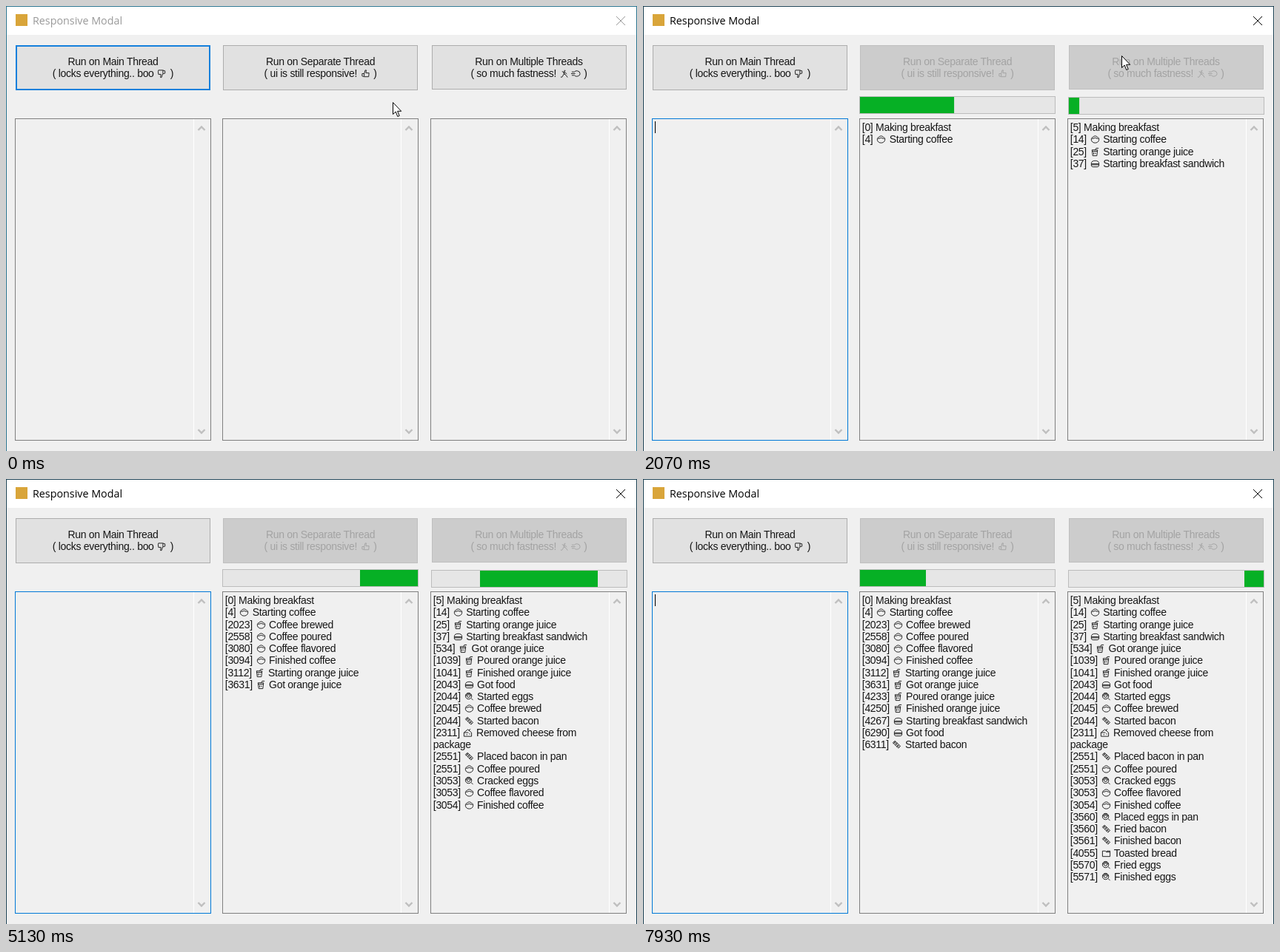
An HTML page for the animation above (8 s loop, 852 by 602 pixels).

```html
<!DOCTYPE html>
<html lang="en">
<head>
<meta charset="utf-8">
<title>Responsive Modal</title>
<style>
  html, body { margin: 0; width: 100%; height: 100%; overflow: hidden; }
  #stage {
    position: relative; width: 852px; height: 602px; overflow: hidden; background: #f0f0f0;
    font: 14px/16.27px "Liberation Sans", sans-serif; letter-spacing: -.3px; color: #161616;
  }
  #stage * { box-sizing: border-box; }
  #stage > * { position: absolute; }
  [hidden] { display: none !important; }
  .titlebar { left: 0; top: 0; width: 852px; height: 39px; background: #fff; color: #000; }
  .titlebar * { position: absolute; }
  .titlebar i { left: 13px; top: 11px; width: 16px; height: 16px; background: #d9a53a; }
  .titlebar b { left: 36px; top: 9px; font: 14.3px/21px "Open Sans", sans-serif; letter-spacing: 0; white-space: nowrap; }
  .titlebar svg { left: 823px; top: 13px; }
  .frame { inset: 0; border: solid #1d4254; border-width: 1px 1px 0; }
  .inactive .titlebar { color: #999; }
  .inactive .frame { border-color: #2b7590; }

  .button {
    top: 53px; width: 263px; height: 61px; padding-top: 13px; text-align: center; white-space: nowrap;
    background: #e1e1e1; border: 1.4px solid #adadad; line-height: 16.3px;
  }
  .button.default { border: 2.4px solid #1580dc; padding-top: 12px; }
  .button.hover { background: #e5f1fb; border-color: #0078d7; }
  .button.pressed { background: #cce4f7; border-color: #005499; }
  .button.disabled { background: #ccc; border-color: #bfbfbf; color: #a3a3a3; }

  .bar { width: 265px; height: 24px; background: #e6e6e6; border: 1px solid #bcbcbc; overflow: hidden; }
  .bar div { position: absolute; left: -1px; top: 0; width: 159px; height: 22px; background: #06b025; }

  .box { top: 152px; width: 265px; height: 436px; border: 1px solid #7f7f7f; }
  .box.focus { border-color: #0078d7; }
  .box.hover { border-color: #171717; }
  .box .rail { position: absolute; left: 240px; top: 0; width: 1px; height: 434px; background: #fff; }
  .box .chevrons { position: absolute; left: 245px; top: 7px; }
  .log { position: absolute; left: 2.8px; top: 3px; width: 237px; }
  .icon { width: 15px; height: 13px; vertical-align: -2px; }
  .icon, .chevrons, .titlebar svg { fill: none; stroke: currentColor; }
  #caret { left: 15.5px; top: 156px; width: 1.5px; height: 16px; background: #000; }
  #cursor { left: 0; top: 0; overflow: visible; }
</style>
</head>
<body>
<div id="stage">
  <div class="titlebar"><i></i><b>Responsive Modal</b>
    <svg width="14" height="14"><path d="M1 1L13 13M13 1L1 13"/></svg></div>
  <div class="frame"></div>
</div>
<script>
const LOOP = 8000, STEP = 800 / 12, FIRST = 730;
const PRESS2 = 1300, START2 = 1440, PRESS3 = 1920, START3 = 2026;
const BAR_SPAN = 424, BAR_LENGTH = 159;

const ICONS = {
  coffee: 'M1.5 8C1 4.500 3 4 4 3.500C5 1.500 9 1.500 10 3.500C12 4 13 5.500 12.500 8C12 11 9 12 7 12S2 11 1.500 8ZM2.500 6Q7 3.500 11.500 6',
  juice: 'M2.500 4H10.500L9.500 12.500H3.500ZM2.500 6H10.500M7 4L8.500 1.500H12M5 7.500V10.500M7.500 8V10',
  sandwich: 'M1.500 6Q2 2.500 7 2.500T12.500 6V9.500Q12 11.500 10 11.500H4Q2 11.500 1.500 9.500ZM1.500 7H12.500M1.500 8.500H12.500',
  egg: 'M1.500 6A4.500 4.500 0 1 1 10.500 6A4.500 4.500 0 1 1 1.500 6ZM4 6A2 2 0 1 1 8 6A2 2 0 1 1 4 6ZM2.500 6A3.500 3.500 0 1 1 9.500 6M9.500 9L12.500 12',
  bacon: 'M1.500 4L4.500 1.500L12.500 9L9.500 12ZM3 2.500L11 10.500M2 5.500L5.500 2.500M4.500 7.500L8 4.500M7 10L10.500 7',
  cheese: 'M1.500 6.500L7 2L12.500 6.500V12H1.500ZM1.500 6.500H8M5 9.500H6.500M9 8.500H10.500M8.500 3L11 1.500',
  bread: 'M1.500 3.500H6L7 5L8 3.500H12.500V11.500H1.500ZM7 5H12',
  down: 'M2 2H8L11.500 3V6.500L8 7.500L6.500 12.500H5L5.500 8H2L1.500 4ZM8.500 2V7',
  up: 'M2 7H5L6.500 2H8L7.500 6H12L11.500 11.500H5L2 10.500ZM5 7V11',
  run: 'M6 2.500H8M7 3L5.500 7L9 9.500L11 12.500M6 7L3 12H1M3 4L7 5L10 7.500M5 5L7.500 8.500',
  dash: 'M1 4.500H5M0 7H6M1 9.500H5M5 4.500Q6 2.500 9 3Q13 3.500 13 7T8 11Q6 11 5 9.500'
};
const icon = name => `<svg class="icon" viewBox="0 0 14 14"><path d="${ICONS[name]}"/></svg>`;

const LOG2 = `0||Making breakfast
4|coffee|Starting coffee
2023|coffee|Coffee brewed
2558|coffee|Coffee poured
3080|coffee|Coffee flavored
3094|coffee|Finished coffee
3112|juice|Starting orange juice
3631|juice|Got orange juice
4233|juice|Poured orange juice
4250|juice|Finished orange juice
4267|sandwich|Starting breakfast sandwich
6290|sandwich|Got food
6311|bacon|Started bacon`;

const LOG3 = `5||Making breakfast
14|coffee|Starting coffee
25|juice|Starting orange juice
37|sandwich|Starting breakfast sandwich
534|juice|Got orange juice
1039|juice|Poured orange juice
1041|juice|Finished orange juice
2043|sandwich|Got food
2044|egg|Started eggs
2045|coffee|Coffee brewed
2044|bacon|Started bacon
2311|cheese|Removed cheese from package
2551|bacon|Placed bacon in pan
2551|coffee|Coffee poured
3053|egg|Cracked eggs
3053|coffee|Coffee flavored
3054|coffee|Finished coffee
3560|egg|Placed eggs in pan
3560|bacon|Fried bacon
3561|bacon|Finished bacon
4055|bread|Toasted bread
5570|egg|Fried eggs
5571|egg|Finished eggs`;

const stage = document.getElementById('stage');
function add(className, left, html = '', parent = stage) {
  const el = document.createElement('div');
  el.className = className;
  if (left !== null) el.style.left = left + 'px';
  el.innerHTML = html;
  return parent.appendChild(el);
}

const buttons = [
  add('button', 13, `Run on Main Thread<br>( locks everything.. boo ${icon('down')} )`),
  add('button', 293, `Run on Separate Thread<br>( ui is still responsive! ${icon('up')} )`),
  add('button', 574.5, `Run on Multiple Threads<br>( so much fastness! ${icon('run')}${icon('dash')} )`)
];
buttons[2].style.height = '60px';

const boxes = [12, 292, 573].map(x => add('box', x, `<div class="rail"></div>
  <svg class="chevrons" width="12" height="422" stroke-width="2.4" color="#bfbfbf">
  <path d="M1.500 8L6 3.500L10.500 8M1.500 413L6 417.500L10.500 413"/></svg><div class="log"></div>`));

// Marquee travel is uneven: [time, distance of the leading edge].
const jobs = [
  { start: START2, box: boxes[1], log: LOG2, bar: add('bar', 292, '<div></div>'), top: 122,
    travel: [[1463, 15], [2063, 128], [3330, 405], [5130, 769], [6930, 1156], [7930, 1362]] },
  { start: START3, box: boxes[2], log: LOG3, bar: add('bar', 573.5, '<div></div>'), top: 123,
    travel: [[2063, 15], [3330, 285], [5130, 649], [6930, 1028], [7930, 1245]] }
];
for (const job of jobs) {
  job.bar.style.top = job.top + 'px';
  const log = job.box.querySelector('.log');
  job.lines = job.log.split('\n').map(line => {
    const [ms, name, text] = line.split('|');
    const el = add('', null, `[${ms}] ${name ? icon(name) + ' ' : ''}${text}`, log);
    return { el, at: job.start + Number(ms) };
  });
}

const caret = add('', null);
caret.id = 'caret';
stage.insertAdjacentHTML('beforeend', `<svg id="cursor" width="14" height="22">
  <path id="arrow" d="M.5.5V16.500L4.200 13L6.800 19.500L9.200 18.500L6.600 12.300H11.700Z" fill="#fff" stroke="#000"/>
  <path id="beam" d="M-2.500-7.500H-.5L.5-6.500L1.500-7.500H3.500M.5-6.500V6.500M-2.500 7.500H-.5L.5 6.500L1.500 7.500H3.500" fill="none" stroke="#222"/></svg>`);
const [cursor, arrow, beam] = ['cursor', 'arrow', 'beam'].map(id => document.getElementById(id));

const POINTER = [
  [730, 522, 130], [1060, 522, 83], [1540, 522, 83], [1860, 646, 67],
  [2430, 646, 67], [3000, 594, 224], [4400, 594, 224], [4680, 600, 602]
];
const smooth = p => p * p * (3 - 2 * p);

function track(points, t, ease = p => p) {
  const next = points.findIndex(p => p[0] > t);
  if (next === 0) return points[0].slice(1);
  if (next < 0) return points.at(-1).slice(1);
  const a = points[next - 1], b = points[next];
  const p = ease((t - a[0]) / (b[0] - a[0]));
  return a.slice(1).map((v, i) => v + (b[i + 1] - v) * p);
}

const within = (x, y, left, top, width, height) =>
  x >= left && x < left + width && y >= top && y < top + height;
const toggle = (el, states) => {
  for (const name in states) el.classList.toggle(name, states[name]);
};

function render(time) {
  const t = time < FIRST ? 0 : FIRST + Math.floor((time - FIRST) / STEP + .001) * STEP;
  const [x, y] = track(POINTER, t, smooth);
  const overText = within(x, y, 573, 152, 265, 436);

  stage.classList.toggle('inactive', t < PRESS2);
  toggle(buttons[0], { default: t < PRESS2 });
  toggle(buttons[1], {
    default: t >= PRESS2 && t < START2,
    hover: t < START2 && within(x, y, 293, 53, 263, 61),
    pressed: t >= PRESS2 && t < START2,
    disabled: t >= START2
  });
  toggle(buttons[2], {
    default: t >= START2 && t < START3,
    hover: t < START3 && within(x, y, 574, 53, 263, 60),
    pressed: t >= PRESS3 && t < START3,
    disabled: t >= START3
  });
  toggle(boxes[0], { focus: t >= START3 });
  toggle(boxes[2], { hover: overText });
  caret.hidden = t < START3 || (t - 2055 + 1070) % 1070 >= 535 && t > 2100;

  for (const { start, bar, travel, lines } of jobs) {
    bar.hidden = t < start;
    const head = track(travel, t)[0] % BAR_SPAN;
    bar.firstChild.style.transform = `translateX(${head - BAR_LENGTH}px)`;
    for (const { el, at } of lines) el.hidden = t < at;
  }

  cursor.style.display = y > 588 ? 'none' : '';
  cursor.style.transform = `translate(${Math.round(x)}px, ${Math.round(y)}px)`;
  arrow.style.display = overText ? 'none' : '';
  beam.style.display = overText ? '' : 'none';
}

const origin = performance.now();
function tick() {
  render((performance.now() - origin) % LOOP);
  requestAnimationFrame(tick);
}
tick();
</script>
</body>
</html>
```
